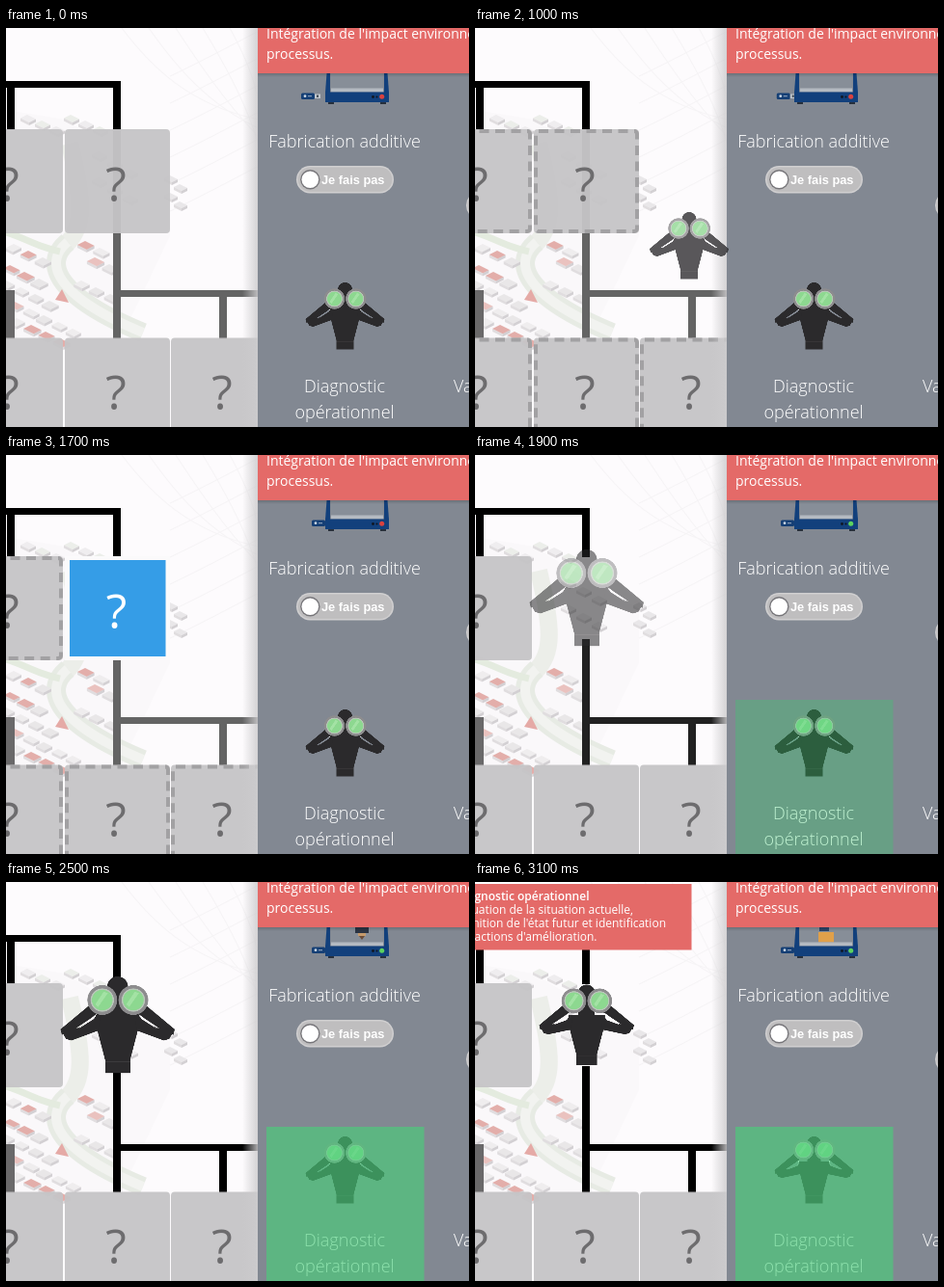
Animation, 480 px wide and 414 px high, one loop 3200 ms. Source, as an HTML page with a canvas:

```html
<!DOCTYPE html>
<html lang="fr">
<head>
<meta charset="utf-8">
<style>
html, body { margin: 0; width: 100%; height: 100%; overflow: hidden; background: #fcfbfc; }
canvas { display: block; }
</style>
</head>
<body>
<canvas id="stage" width="480" height="414"></canvas>
<script>
const LOOP = 3200, STEP = 100;
const ctx = document.getElementById('stage').getContext('2d');
const SANS = '"Open Sans", sans-serif';
const RED = '#e46a68', PANEL = '#828892', NAVY = '#12407c';

const clamp = v => Math.max(0, Math.min(1, v));
const ramp = (t, a, b) => clamp((t - a) / (b - a));
const ease = p => p * p * (3 - 2 * p);
const mix = (a, b, p) => a + (b - a) * p;

function rect(x, y, w, h, color, c = ctx) {
  c.fillStyle = color;
  c.fillRect(x, y, w, h);
}

function round(x, y, w, h, r, color) {
  ctx.fillStyle = color;
  ctx.beginPath();
  ctx.roundRect(x, y, w, h, r);
  ctx.fill();
}

function poly(pts, color, c = ctx) {
  c.fillStyle = color;
  c.beginPath();
  pts.forEach(([x, y]) => c.lineTo(x, y));
  c.closePath();
  c.fill();
}

function disc(x, y, r, color, c = ctx) {
  c.fillStyle = color;
  c.beginPath();
  c.arc(x, y, r, 0, Math.PI * 2);
  c.fill();
}

function text(s, x, y, font, color = '#fff', align = 'left') {
  ctx.font = font;
  ctx.fillStyle = color;
  ctx.textAlign = align;
  ctx.fillText(s, x, y);
}

function makeCanvas(w, h, scale) {
  const c = document.createElement('canvas');
  c.width = w * scale;
  c.height = h * scale;
  const g = c.getContext('2d');
  g.scale(scale, scale);
  return [c, g];
}

// Person with binoculars, 90 x 76, centred on (45, 38)
const [watcher, pen] = makeCanvas(90, 76, 4);
pen.translate(45, 38);

// lift raises the arms and the binoculars
function paintWatcher(lift) {
  const g = pen, dark = '#2b2a2c';
  g.clearRect(-45, -38, 90, 76);
  disc(0, -27.5, 7.5, dark, g);
  poly([[-16, -9], [16, -9], [15, 2], [9, 25], [9, 34.5], [-9, 34.5], [-9, 25], [-15, 2]], dark, g);
  for (const s of [-1, 1]) {
    // forearm, then upper arm, with a narrow gap between them
    poly([[s * 17, -17 - lift], [s * 41, 3 - lift], [s * 40, 7 - lift], [s * 31, 3 - lift],
      [s * 13, -9 - lift]], dark, g);
    poly([[s * 41, 3 - lift], [s * 37, 10 - lift], [s * 33, 11 - lift], [s * 14, 4],
      [s * 12, -8], [s * 16, -6], [s * 28, 2 - lift]], dark, g);
    poly([[s * 28, 2.5 - lift], [s * 15, -8 - lift], [s * 17, -4.5]], '#fff', g);
  }
  rect(-7, -24, 14, 16, dark, g);
  rect(-9, 26, 18, 0.6, '#3c3b3d', g);
  for (const x of [-11, 11.3]) {
    const y = -18 - lift;
    disc(x, y, 10.7, '#8d8c8e', g);
    disc(x, y, 8.4, '#b9c7b9', g);
    disc(x, y, 7.4, '#8dd890', g);
    poly([[x - 5, y + 3], [x + 1, y - 6], [x + 4, y - 5], [x - 3, y + 5]], '#a3e2a4', g);
  }
  // punch the gaps out so the background shows through
  g.globalCompositeOperation = 'destination-out';
  for (const s of [-1, 1]) {
    poly([[s * 28, 2.5 - lift], [s * 16.5, -7 - lift], [s * 17, -4.5]], '#000', g);
  }
  g.globalCompositeOperation = 'source-over';
}

function drawWatcher(x, y, scale, alpha = 1) {
  ctx.globalAlpha = alpha;
  ctx.drawImage(watcher, x - 45 * scale, y - 38 * scale, 90 * scale, 76 * scale);
  ctx.globalAlpha = 1;
}

function makeCity() {
  const [c, g] = makeCanvas(262, 414, 2);
  let seed = 7;
  const rnd = () => (seed = (seed * 16807) % 2147483647) / 2147483647;
  rect(0, 0, 262, 414, '#fdfbfd', g);
  poly([[0, 85], [60, 95], [170, 160], [170, 215], [120, 320], [0, 330]], '#faf8fa', g);

  const curve = (color, width, pts) => {
    g.strokeStyle = color;
    g.lineWidth = width;
    g.beginPath();
    g.moveTo(pts[0], pts[1]);
    g.bezierCurveTo(...pts.slice(2));
    g.stroke();
  };
  for (let i = 0; i < 6; i++) {
    curve('#f6f4f6', 1, [120 + i * 28, 0, 150 + i * 26, 40, 190 + i * 20, 80, 262, 95 + i * 9]);
    curve('#f6f4f6', 1, [170, 190 - i * 28, 200, 176 - i * 28, 230, 160 - i * 28, 262, 143 - i * 28]);
  }
  curve('#eceee9', 18, [66, 120, 80, 180, 82, 205, 62, 225]);
  curve('#e7ebe4', 20, [64, 222, 36, 245, 55, 280, 142, 316]);
  curve('#f2f3f0', 10, [64, 222, 36, 245, 55, 280, 142, 316]);
  curve('#e4ebdf', 7, [0, 212, 20, 218, 30, 226, 56, 232]);

  const block = (x, y, w, d, h, top) => {
    const r = [x + w, y + w / 2], l = [x - d, y + d / 2], f = [x + w - d, y + (w + d) / 2];
    const down = p => [p[0], p[1] + h];
    poly([l, f, down(f), down(l)], '#e0dddf', g);
    poly([f, r, down(r), down(f)], '#d3d0d3', g);
    poly([[x, y], r, f, l], top, g);
  };
  const tops = ['#eac2bf', '#efedee', '#e3aeaa', '#e9e7e8'];
  const rows = [[8, 224, 3], [82, 221, 2], [92, 238, 2], [4, 246, 3], [0, 262, 4],
    [-6, 277, 6], [-4, 294, 5], [78, 262, 3]];
  for (const [x, y, n] of rows) {
    for (let i = 0; i < n; i++) {
      block(x + i * 15, y + i * 7, 8 + rnd() * 3, 6 + rnd() * 3, 3, tops[Math.floor(rnd() * 4)]);
    }
  }
  poly([[58, 271], [65, 285], [51, 282]], '#e5aaa6', g);
  for (let i = 0; i < 6; i++) {
    block(22 + i * 15, 90 + (i % 3) * 6, 9, 7, 3, i % 2 ? '#eceeea' : '#efedef');
    block(96 + (i % 3) * 16, 128 + i * 9, 9, 7, 3, '#f0eef0');
  }
  for (let i = 0; i < 4; i++) {
    block(170 + (i % 2) * 10, 153 + i * 9, 8, 6, 3, '#e9e7e9');
  }
  return c;
}

const city = makeCity();

function drawLines(t) {
  const v = Math.round(mix(100, 0, ramp(t, 1700, 2000)));
  const link = `rgb(${v},${v},${v})`;
  const top = t < 1800 ? 106 : 191;
  rect(0, 55, 119, 7, '#000');
  rect(1, 55, 8, 51, '#000');
  rect(111, 55, 8, 51, '#000');
  rect(111, top, 8, 323 - top, link);
  rect(119, 272, 142, 7, link);
  rect(221, 279, 8, 44, link);
  rect(0, 272, 9, 51, '#6a696a');
}

function question(x, y, color) {
  text('?', x, y, '50px ' + SANS, color, 'center');
}

function drawBox(x, y, dashed) {
  round(x, y, 109, 108, 4, 'rgba(198,197,199,.95)');
  if (dashed) {
    ctx.strokeStyle = '#a2a1a3';
    ctx.lineWidth = 4;
    ctx.setLineDash([10, 6.5]);
    ctx.beginPath();
    ctx.roundRect(x + 2, y + 2, 105, 104, 3);
    ctx.stroke();
    ctx.setLineDash([]);
  }
  question(x + 53, y + 74.5, '#6d6c6e');
}

function drawBoard(t) {
  ctx.drawImage(city, 0, 0, 262, 414);
  drawLines(t);
  const dashed = t >= 700 && t < 1800;
  for (const [x, y] of [[-50, 105], [-50, 321.5], [61, 321.5], [171, 321.5]]) drawBox(x, y, dashed);
  if (t < 1300) {
    drawBox(61, 105, dashed);
  } else if (t < 1800) {
    rect(61, 105, 109, 108, '#fbfafb');
    rect(66, 109, 99.5, 100, '#359de7');
    question(114.5, 179.5, '#fff');
  } else {
    const p = ease(ramp(t, 2600, 2900));
    drawWatcher(115.7, 148.5, mix(1.445, 1.2, p), mix(0.4, 1, ramp(t, 1800, 2200)));
  }
}

function drawTip() {
  rect(0, 2, 224.5, 68.5, RED);
  const font = '12px ' + SANS;
  text('Diagnostic opérationnel', 118.5, 19, '600 12px ' + SANS, '#fff', 'right');
  text('Évaluation de la situation actuelle,', 164, 33, font, '#fff', 'right');
  text("définition de l'état futur et identification", 198, 47, font, '#fff', 'right');
  text("des actions d'amélioration.", 126.5, 61, font, '#fff', 'right');
}

function drawUsb(t) {
  const x = mix(306, 317, ramp(t, 600, 1250));
  ctx.save();
  ctx.beginPath();
  ctx.rect(300, 47, 32, 40);
  ctx.clip();
  round(x, 67.5, 14, 6.5, 1.5, '#153f75');
  disc(x + 4, 70.7, 1.4, '#c8d4e2');
  rect(x + 7, 70.2, 4, 1, '#9fb1c8');
  rect(x + 14, 68.5, 6, 4.5, '#bfc5cc');
  rect(x + 16, 69.6, 2, 2.2, '#3e4650');
  ctx.restore();
}

function drawPrinter(t) {
  drawUsb(t);
  rect(337, 47, 54, 19, '#878e98');
  if (t >= 2300) {
    const p = ramp(t, 2500, 3100);
    const x = mix(369, 362, p);
    if (t >= 2600) rect(356, 62.5 - 10.5 * p, 16, 10.5 * p, '#e0a04a');
    if (t < 3000) {
      rect(x - 7, 47, 14, 6, '#2b3443');
      rect(x - 4, 53, 8, 3, '#c49a6c');
      poly([[x - 3, 56], [x + 3, 56], [x, 60]], '#6a4c38');
    } else {
      rect(x - 5, 47, 10, 4, '#2b4468');
    }
  }
  rect(337, 62.5, 54, 4, '#b4bac1');
  poly([[332.5, 47], [336, 47], [336, 67], [331, 67]], NAVY);
  poly([[392, 47], [395.5, 47], [397, 67], [392, 67]], NAVY);
  rect(331, 66.5, 66, 10.5, NAVY);
  rect(334, 77, 6, 2, '#27303c');
  rect(388, 77, 6, 2, '#27303c');
  disc(380.5, 71.5, 1.4, '#111722');
  disc(384.5, 71.5, 1.1, '#111722');
  disc(389.7, 71.3, 2.5, t < 1900 ? '#d9423f' : '#5cd35f');
}

function drawToggle() {
  round(301, 143, 101, 28.5, 14.25, '#d0cfd0');
  round(302.5, 144.5, 98, 25.5, 12.75, '#bfbebf');
  disc(315.3, 157.3, 10.2, '#77767a');
  disc(315.3, 157.3, 8.8, '#fff');
  text('Je fais pas', 327, 161.5, 'bold 12.8px "Liberation Sans", Arial, sans-serif');
  disc(491, 184, 14, '#d0cfd0');
  disc(491, 184, 12.6, '#bfbebf');
}

function drawPanel(t) {
  const shade = ctx.createLinearGradient(245, 0, 261, 0);
  shade.addColorStop(0, 'rgba(204,203,205,0)');
  shade.addColorStop(1, 'rgba(204,203,205,.85)');
  rect(245, 0, 16, 414, shade);
  rect(261, 0, 219, 414, PANEL);

  drawPrinter(t);
  const head = ctx.createLinearGradient(0, 47, 0, 51);
  head.addColorStop(0, 'rgba(0,0,0,.18)');
  head.addColorStop(1, 'rgba(0,0,0,0)');
  rect(261, 47, 219, 4, head);
  rect(261, 0, 219, 47, RED);
  const title = '500 14px ' + SANS;
  text("Intégration de l'impact environnemental", 270, 10.5, title);
  text('processus.', 270, 31.5, title);

  const label = '300 18px ' + SANS;
  text('Fabrication additive', 351, 124, label, '#fff', 'center');
  drawToggle();
  drawWatcher(351.5, 299, 1);
  text('Diagnostic', 351, 378, label, '#fff', 'center');
  text('opérationnel', 351, 405, label, '#fff', 'center');
  text('Valorisation', 464, 378, label);

  const done = ramp(t, 1700, 2500);
  if (done > 0) {
    ctx.globalAlpha = 0.62 * Math.sqrt(done);
    rect(270, 254, 163.5, 160, `rgb(${mix(36, 72, done)},208,${mix(100, 121, done)})`);
    ctx.globalAlpha = 1;
  }
}

function drawDrag(t) {
  if (t < 700 || t >= 1700) return;
  const p = ease(ramp(t, 600, 1400));
  drawWatcher(mix(351.5, 92.5, p), mix(299, 153, p), 1, 0.78);
}

function draw(t) {
  paintWatcher(3 * ease(ramp(t, 2500, 3000)));
  drawBoard(t);
  drawPanel(t);
  drawDrag(t);
  if (t >= 3100) drawTip();
}

const start = performance.now();
function tick() {
  const elapsed = performance.now() - start;
  draw(Math.floor((elapsed % LOOP) / STEP) * STEP);
  requestAnimationFrame(tick);
}
tick();
</script>
</body>
</html>
```
